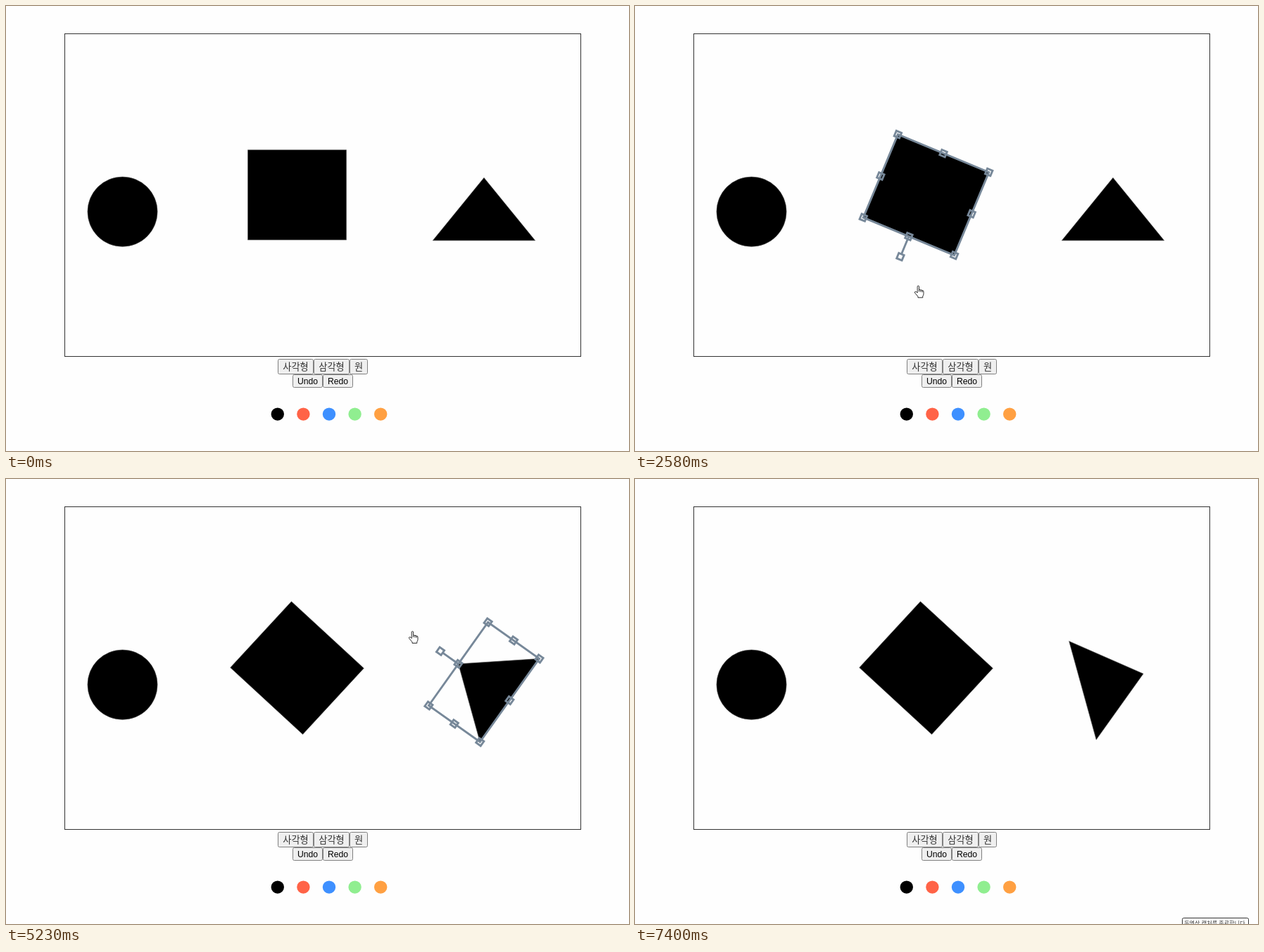
An HTML page for the animation above (7.6 s loop, 885 px wide and 633 px high).

```html
<!DOCTYPE html>
<html lang="ko">
<head>
<meta charset="utf-8">
<title>Shape editor</title>
<style>
  html, body { margin: 0; width: 100%; height: 100%; overflow: hidden; background: #fefefe; }
  svg { display: block; }
  .shape { stroke: #555; stroke-width: .6; }
  .selection { fill: none; stroke: #778899; stroke-width: 2.9; }
  .button rect { fill: #efefef; stroke: #808080; }
  text { font: 12.2px "Liberation Sans", Arial, sans-serif; text-anchor: middle; }
  text.ko { font: 400 13.2px "Noto Sans CJK KR", "Noto Sans CJK", sans-serif; fill: #333; }
  #tip text { font-size: 8.1px; }
  .cursor { fill: #fff; stroke: #111; stroke-width: 1.1; stroke-linejoin: round; }
</style>
</head>
<body>
<svg id="stage" width="885" height="633" viewBox="0 0 885 633">
  <rect x="83.5" y="39.5" width="733" height="459" fill="none" stroke="#333"/>
  <g id="controls"></g>
  <circle class="shape" cx="165.5" cy="292.6" r="49.6"/>
  <g id="square"><path class="shape" d="M-70-64H70V64H-70Z"/></g>
  <g id="triangle"><path class="shape" d="M0-44.7L72.7 44.7H-72.7Z"/></g>
  <g id="tip">
    <rect x=".5" y="624.5" width="94" height="16" rx="2" fill="#fff" stroke="#333"/>
    <text class="ko" x="47.5" y="634.6">동영상 캡처를 종료합니다.</text>
  </g>
  <g id="cursor" class="cursor">
    <path id="arrow" transform="scale(.8)" d="M.5.5V16.5L4.2 13L6.6 18.4L9 17.4L6.6 12H11.7Z"/>
    <path id="hand" transform="scale(.8) translate(-6.8 -.5)" d="M5.5 13V2Q5.5.5 7 .5T8.5 2V8Q10 6.5 11.3 8Q13 7.3 14 8.8Q16.5 8.5 16.5 11V15Q16.5 17 15 19V21.5H6.5V19.5L1 13Q.3 11 2 10.7Q4 10.7 5.5 13ZM8.5 8V11M11.3 8V11.5M14 8.8V12"/>
  </g>
</svg>
<script>
const LOOP = 7600, STEP = 98.7;
const $ = id => document.getElementById(id);

function add(parent, tag, attrs, text = '') {
  const node = document.createElementNS('http://www.w3.org/2000/svg', tag);
  for (const key in attrs) node.setAttribute(key, attrs[key]);
  node.textContent = text;
  return parent.appendChild(node);
}

function addButton(x, y, width, height, label, ko) {
  const g = add($('controls'), 'g', { class: 'button' });
  add(g, 'rect', { x: x + .5, y: y + .5, width: width - 1, height: height - 1, rx: 2 });
  add(g, 'text', { x: x + width / 2, y: y + (ko ? 15.5 : 14), class: ko ? 'ko' : '' }, label);
}

addButton(386, 502, 51, 22, '사각형', true);
addButton(437, 502, 51, 22, '삼각형', true);
addButton(488, 502, 26, 22, '원', true);
addButton(407, 524, 43, 19, 'Undo');
addButton(450, 524, 43, 19, 'Redo');

['#000', '#ff6347', '#3e90ff', '#90ee90', '#ffa042'].forEach((fill, i) =>
  add($('controls'), 'circle', { cx: 385.8 + i * 36.6, cy: 580.6, r: 9.2, fill }));

// Bounding box with eight resize handles and a rotation handle
function addSelection(parent, w, h) {
  const g = add(parent, 'g', { class: 'selection' });
  const handle = (x, y) => add(g, 'rect', { x: x - 4, y: y - 4, width: 8, height: 8 });
  add(g, 'path', { d: `M${-w}${-h}H${w}V${h}H${-w}ZM0 ${-h}V${-h - 27}` });
  for (const x of [-1, 0, 1])
    for (const y of [-1, 0, 1])
      if (x || y) handle(x * w, y * h);
  handle(0, -h - 31.3);
  return g;
}

const squareBox = addSelection($('square'), 70, 64);
const triangleBox = addSelection($('triangle'), 72.7, 44.7);

// Smooth 0..1 ramp between two steps
function ease(step, from, to) {
  const u = Math.min(1, Math.max(0, (step - from) / (to - from)));
  return u * u * (3 - 2 * u);
}

// Clockwise round past the bottom, a swing back, then settle
const squareTurn = step =>
  230 * ease(step, 16, 24.5) - 68.5 * ease(step, 24.7, 27.7) + 61.2 * ease(step, 27.7, 31);

// To the left, over the top to the right, then a last nudge
const triangleTurn = step =>
  -58.5 * ease(step, 46, 52) + 114 * ease(step, 52.5, 57) + 19.1 * ease(step, 58, 61);

// Pointer while dragging: circles the shape, with a radius that depends on the sideways swing
function orbit(cx, cy, degrees, radius) {
  const angle = degrees * Math.PI / 180, swing = Math.sin(angle), r = radius(swing);
  return [cx + r * swing, cy - r * Math.cos(angle)];
}

// Free pointer moves, each starting where the previous one ended
const moves = [
  { from: 2, to: 5, x: 371, y: 239 },
  { from: 8, to: 12, x: 415, y: 173 },
  { from: 31, to: 32, x: 306, y: 385 },
  { from: 32, to: 35, x: 648, y: 300 },
  { from: 37, to: 41, x: 685, y: 228 },
  { from: 41, to: 44, x: 684, y: 213 },
  { from: 60, to: 61, x: 757, y: 266 },
  { from: 63, to: 70, x: 850, y: 650 }
];

function pointer(step) {
  if (step >= 17 && step < 32)
    return orbit(413.5, 283, squareTurn(step + .5), swing => 115 + 60 * swing * swing);
  if (step >= 47 && step < 61)
    return orbit(679, 289, triangleTurn(step), swing => 80 + 55 * Math.max(0, -swing));
  let x = 680, y = 615;
  for (const move of moves) {
    const k = ease(step, move.from, move.to);
    x += (move.x - x) * k;
    y += (move.y - y) * k;
  }
  return [x, y];
}

const show = (node, visible) => node.setAttribute('display', visible ? 'inline' : 'none');
const place = (id, x, y, angle = 0) =>
  $(id).setAttribute('transform', `translate(${x} ${y}) rotate(${angle})`);

function draw(now) {
  const step = Math.floor((now % LOOP + 8) / STEP);
  const within = (from, to) => step >= from && step < to;
  const rotating = within(12, 33) || within(45, 63);
  place('square', 413.5, 268.7, squareTurn(step));
  place('triangle', 679, 288.9, triangleTurn(step));
  place('cursor', ...pointer(step));
  place('tip', step < 75 ? 782 : 777, 0);
  show(squareBox, within(7, 33));
  show(triangleBox, within(37, 63));
  show($('cursor'), within(2, 70));
  show($('hand'), rotating);
  show($('arrow'), !rotating);
  show($('tip'), step >= 73);
}

const start = performance.now();
function tick() {
  draw(performance.now() - start);
  requestAnimationFrame(tick);
}
tick();
</script>
</body>
</html>
```
